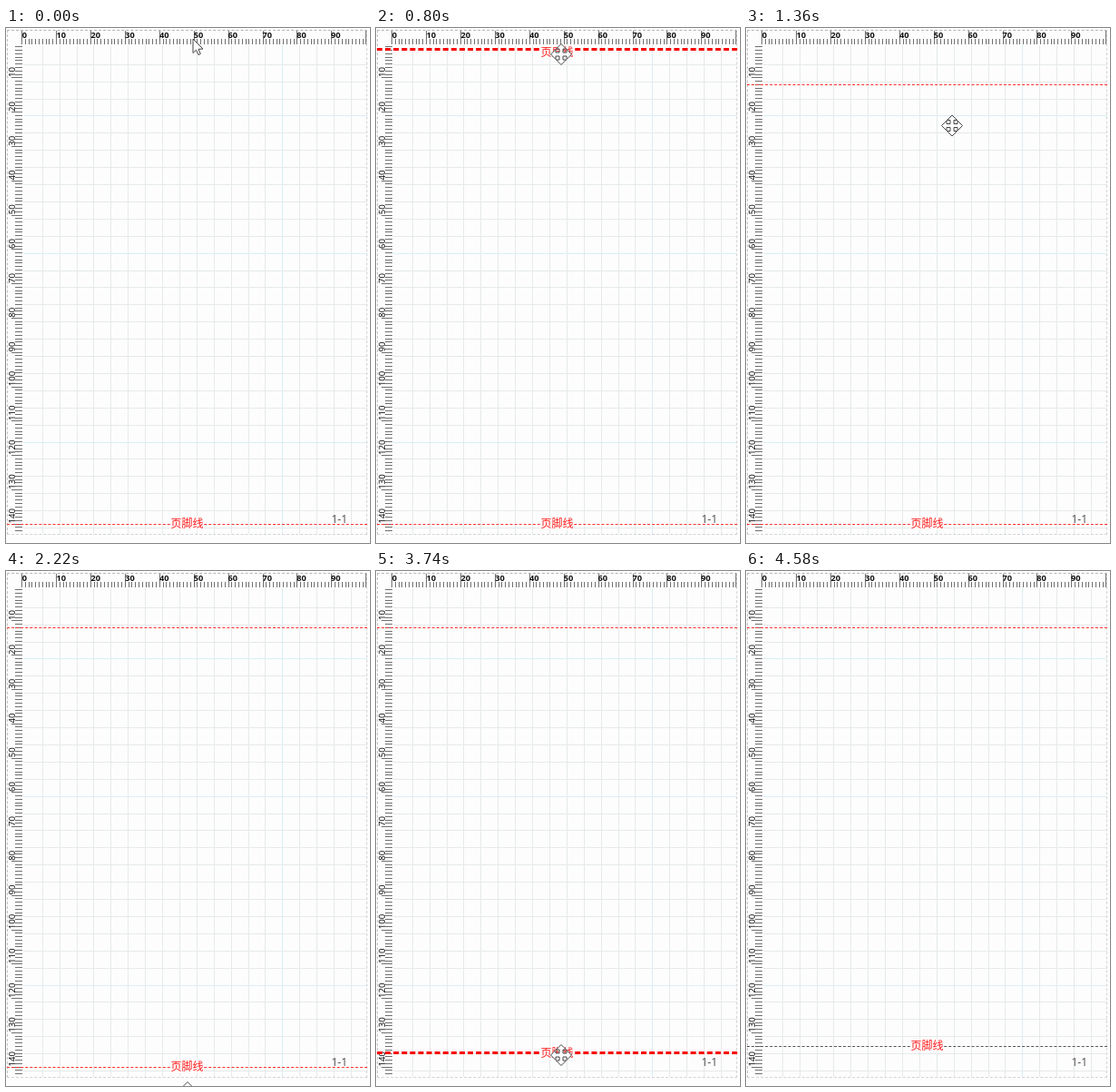
These frames come from a looping animation (401x567 px, 4.78 s). An HTML page with a canvas:

```html
<!DOCTYPE html>
<html lang="zh">
<head>
<meta charset="utf-8">
<title>Page ruler</title>
<style>
  html, body { margin: 0; width: 100%; height: 100%; overflow: hidden; background: #fdfdfd; }
  canvas { display: block; }
</style>
</head>
<body>
<canvas id="stage" width="401" height="567"></canvas>
<script>
const ctx = document.getElementById('stage').getContext('2d');
const LOOP = 4780;
const MM = 3.78;
const RED = '#ff3030';
const CJK = '12px "Noto Sans CJK SC", "Noto Sans CJK", sans-serif';

// Pointer: [time, kind, x, y]
const pointerSteps = [
  [0, 'arrow', 206, 12], [60, 'arrow', 205, 8], [120, 'move', 204, 7],
  [520, 'move', 204, 8], [600, 'move', 204, 11], [660, 'move', 204, 16],
  [740, 'move', 204, 22], [800, 'move', 204, 29], [880, 'move', 205, 43],
  [940, 'move', 206, 57], [1020, 'move', 207, 66], [1100, 'move', 208, 68],
  [1360, 'move', 227, 107.5], [1420, 'move', 232, 165], [1500, 'move', 232, 235],
  [1560, 'move', 229, 300], [1640, 'move', 223, 365], [1700, 'move', 216, 425],
  [1780, 'move', 209, 475], [1840, 'move', 204, 510], [1900, 'move', 202, 530],
  [1960, 'move', 201, 543], [2020, 'move', 200, 549], [2220, 'move', 200, 574],
  [2280, 'none', 0, 0], [2960, 'move', 200, 551], [3100, 'move', 200, 553],
  [3180, 'move', 200, 552], [3600, 'move', 201, 549], [3660, 'move', 203, 542],
  [3740, 'move', 204, 533], [3820, 'move', 204, 528], [3880, 'move', 204, 526],
  [4080, 'move', 206, 490], [4160, 'move', 210, 415], [4220, 'move', 214, 335],
  [4300, 'move', 216, 250], [4360, 'move', 215, 170], [4440, 'move', 212, 95],
  [4500, 'move', 209, 30], [4580, 'none', 0, 0]
];

// Guide lines: [time, y, state]
const headerSteps = [
  [0, 0, 'hidden'], [120, 2.5, 'active'], [520, 3.5, 'active'], [600, 6.5, 'active'],
  [660, 11.5, 'active'], [740, 17.5, 'active'], [800, 23.5, 'active'], [880, 38.5, 'active'],
  [940, 52.5, 'active'], [1020, 61.5, 'active'], [1100, 62.5, 'active'], [1360, 62.5, 'idle']
];
const footerSteps = [
  [0, 546.5, 'idle'], [2960, 547.5, 'active'], [3600, 544.5, 'active'], [3660, 538.5, 'active'],
  [3740, 530.5, 'active'], [3820, 525.5, 'active'], [3880, 523.5, 'active'], [4080, 523.5, 'idle']
];

const at = (steps, t) => steps.reduce((found, step) => step[0] <= t ? step : found);

function line(x1, y1, x2, y2, color, width = 1, dash = []) {
  ctx.strokeStyle = color;
  ctx.lineWidth = width;
  ctx.setLineDash(dash);
  ctx.beginPath();
  ctx.moveTo(x1, y1);
  ctx.lineTo(x2, y2);
  ctx.stroke();
}

// Widens the gap so that the line ends with a whole dash.
function dashedLine(x1, y1, x2, y2, color, width = 1) {
  const [dash, gap] = width < 3 ? [3 * width, 2 * width] : [2 * width, width];
  const length = x2 - x1 + y2 - y1;
  const count = Math.floor((length + gap) / (dash + gap));
  line(x1, y1, x2, y2, color, width, [dash, (length - count * dash) / (count - 1)]);
}

function text(str, x, y, font, color, align = 'left') {
  ctx.font = font;
  ctx.fillStyle = color;
  ctx.textAlign = align;
  ctx.fillText(str, x, y);
}

function shape(points, x, y) {
  ctx.setLineDash([]);
  ctx.beginPath();
  points.forEach(([px, py]) => ctx.lineTo(x + px, y + py));
  ctx.closePath();
  ctx.fillStyle = '#fff';
  ctx.fill();
  ctx.strokeStyle = '#444';
  ctx.lineWidth = 1;
  ctx.stroke();
}

const snap = v => Math.floor(v) + 0.5;

function drawGrid() {
  const color = blue => blue ? '#dbeff6' : '#e6eaea';
  for (let i = 1; i < 20; i++) {
    const x = snap(21.3 + i * 5 * MM);
    line(x, 19, x, 557, color(i === 15));
  }
  for (let i = 1; i < 29; i++) {
    const y = snap(21.3 + i * 5 * MM);
    line(19, y, 398, y, color([4, 12, 23].includes(i)));
  }
}

function drawRulers() {
  const tick = '#707070';
  const face = 'px "Noto Sans", sans-serif';
  for (let i = 0; i <= 100; i++) {
    const x = snap(17.5 + i * 3.793);
    const major = i % 10 === 0;
    line(x, major ? 3 : 12, x, 18, tick);
    if (major && i < 100) text(i, 17.8 + i * MM, 11, '600 9.2' + face, '#111');
  }
  for (let i = 1; i <= 142; i++) {
    const y = snap(17 + i * MM);
    const major = i % 10 === 0;
    line(major ? 6 : 10, y, 18, y, tick);
    if (major) {
      ctx.save();
      ctx.translate(10, 16.3 + i * MM);
      ctx.rotate(-Math.PI / 2);
      text(i, 0, 0, '500 9.6' + face, '#111');
      ctx.restore();
    }
  }
}

function drawBorder() {
  dashedLine(1, 2.5, 398, 2.5, '#b5b5b5');
  dashedLine(1.5, 2, 1.5, 558, '#c0c0c0');
  dashedLine(397.5, 2, 397.5, 558, '#d4d4d4');
  dashedLine(1, 557.5, 398, 557.5, '#d4d4d4');
}

function drawGuide(y, state, label, labelShift, idleColor = RED) {
  if (state === 'hidden') return;
  const active = state === 'active';
  dashedLine(1, y, 398, y, active ? '#f80000' : idleColor, active ? 3 : 1);
  if (!label) return;
  const middle = y + labelShift;
  ctx.fillStyle = '#fdfdfd';
  ctx.fillRect(181.5, middle - 7, 36, 14);
  text(label, 199.5, middle + 4.5, CJK, '#ff1a1a', 'center');
}

const arrowPoints = [[0, 0], [0, 15.5], [3.5, 12.2], [6, 17.5], [8.3, 16.5], [6, 11.3], [11, 11]];
const quarter = [[-2, -2], [-2, -6], [-5.5, -6], [0, -11.5], [5.5, -6], [2, -6]];
const movePoints = [0, 1, 2, 3].flatMap(turns => quarter.map(point => {
  let [x, y] = point;
  for (let i = 0; i < turns; i++) [x, y] = [-y, x];
  return [x, y];
}));

function render(t) {
  ctx.fillStyle = '#fdfdfd';
  ctx.fillRect(0, 0, 401, 567);
  drawGrid();
  drawRulers();
  drawBorder();

  const [, headerY, headerState] = at(headerSteps, t);
  const [, footerY, footerState] = at(footerSteps, t);
  drawGuide(headerY, headerState, headerState === 'active' ? '页眉线' : '', 3);
  drawGuide(footerY, footerState, '页脚线', footerState === 'active' ? 0 : -1, t < 4080 ? RED : '#555');
  text('1-1', 358.5, 545, '12px "Noto Sans", sans-serif', '#555');

  const [, kind, x, y] = at(pointerSteps, t);
  if (kind === 'arrow') shape(arrowPoints, x, y);
  if (kind === 'move') shape(movePoints, x, y);
}

const start = performance.now();
function tick() {
  render((performance.now() - start) % LOOP);
  requestAnimationFrame(tick);
}
tick();
</script>
</body>
</html>
```
